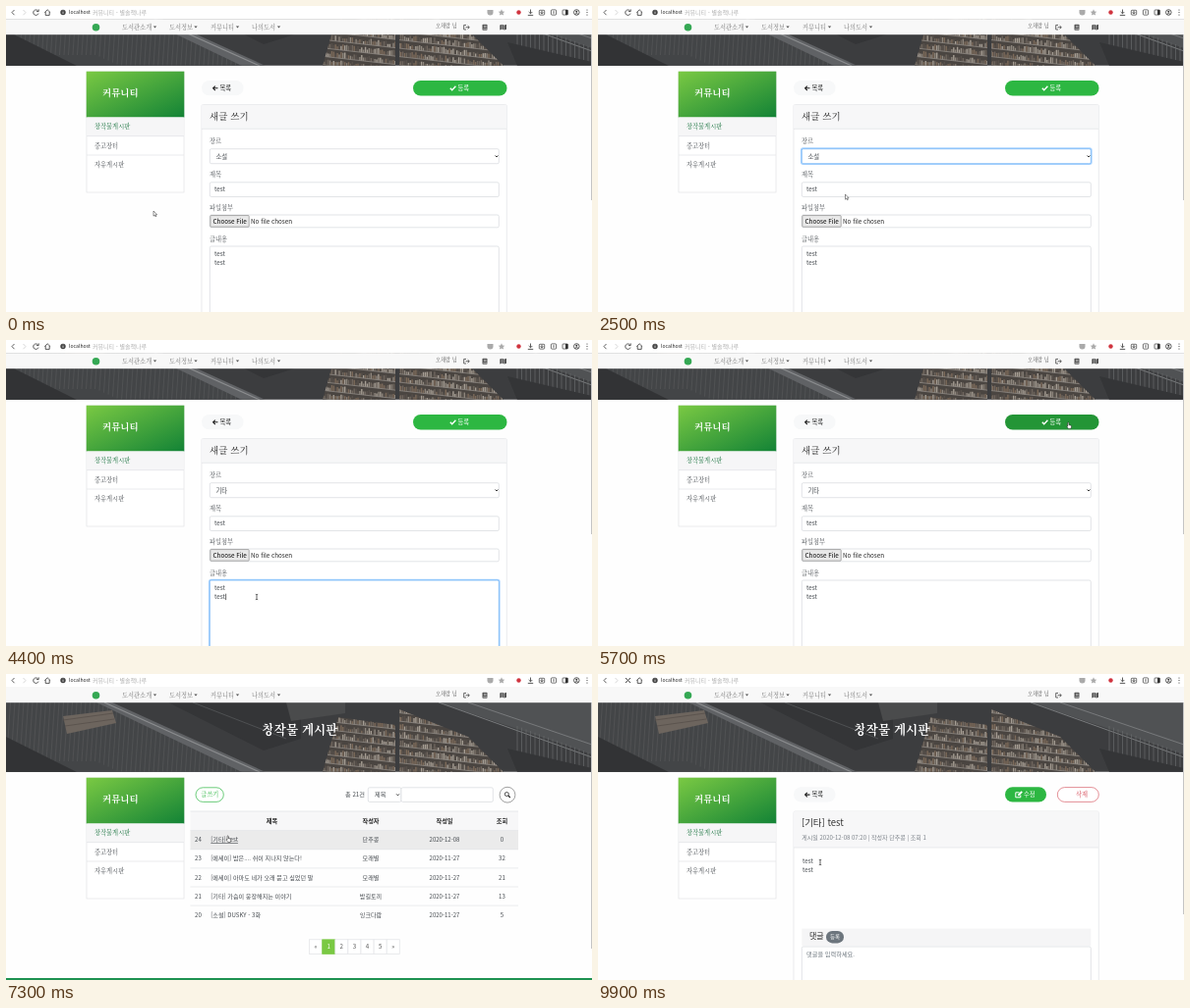
Write an HTML page that moves like this. It is 596 by 312 pixels and loops after 10000 ms.

```html
<!DOCTYPE html>
<html lang="ko">
<head>
<meta charset="utf-8">
<style>
html, body { margin: 0; width: 100%; height: 100%; overflow: hidden; background: #fff; }
svg { display: block; width: 596px; height: 312px; }
text { font-family: "Noto Sans CJK KR", "Noto Sans KR", "Noto Sans CJK", sans-serif; white-space: pre; }
.serif { font-family: "Noto Serif CJK KR", "Noto Serif KR", "Noto Sans CJK KR", serif; font-weight: 500; }
.strong { font-weight: 600; }
</style>
</head>
<body>
<svg id="stage" viewBox="0 0 596 312"></svg>
<script>
const LOOP = 10000, STEP = 100;
const GREEN = '#2db742', DARK = '#44494e', LINE = '#e1e3e6', PALE = '#f7f7f8';
const AUTHOR = '단추콩';

// y is the vertical middle of the text
const text = (x, y, s, size = 6.3, fill = DARK, more = '') =>
  `<text x="${x}" y="${y + size * .36}" font-size="${size}" fill="${fill}" ${more}>${s}</text>`;
const serif = (x, y, s, size = 6.25, fill = DARK, more = '', cls = '') =>
  text(x, y, s, size, fill, `class="serif ${cls}" ${more}`);
const MID = 'text-anchor="middle"';
const rect = (x, y, w, h, fill, stroke = 'none', r = 0) =>
  `<rect x="${x}" y="${y}" width="${w}" height="${h}" rx="${r}" fill="${fill}" stroke="${stroke}" stroke-width=".7"/>`;
const path = (d, stroke = DARK, w = .8, fill = 'none') =>
  `<path d="${d}" stroke="${stroke}" stroke-width="${w}" fill="${fill}"/>`;
const shape = (d, fill) => path(d, 'none', 0, fill);
const circle = (x, y, r, fill, stroke = 'none') =>
  `<circle cx="${x}" cy="${y}" r="${r}" fill="${fill}" stroke="${stroke}" stroke-width=".8"/>`;
const at = (x, y, s) => `<g transform="translate(${x} ${y})">${s}</g>`;
const clip = (id, s) => `<g clip-path="url(#${id})">${s}</g>`;
const field = (x, y, w, h, focus) =>
  (focus ? `<rect x="${x - .6}" y="${y - .6}" width="${w + 1.2}" height="${h + 1.2}" rx="2" fill="none" stroke="#a9d3ff" stroke-width="1.5"/>` : '') +
  rect(x, y, w, h, '#fff', focus ? '#64adf5' : '#d6d9dd', 1.5);
const chevron = (x, y) => path(`M${x - 1.4} ${y - .8}l1.4 1.5 1.4-1.5`, '#222', .9);

const BOOKCASES = 'M338 44L396 52V100H322zM400 36L470 64 506 100H400z';
const DEFS = `<defs>
  <linearGradient id="leaf" x1="0" y1="0" x2="1" y2="1">
    <stop offset="0" stop-color="#7ac943"/><stop offset="1" stop-color="#138336"/></linearGradient>
  <clipPath id="hall"><path d="M0 29H596V99.8H0z"/></clipPath>
  <clipPath id="cases"><path d="${BOOKCASES}"/></clipPath></defs>`;

function browserBar(loading) {
  const grey = '#aaa', ink = '#333';
  return rect(0, 0, 596, 13.5, '#fff') +
    path('M8.5 4L6 6.6l2.5 2.6', ink) + path('M17.5 4L20 6.6l-2.5 2.6', '#ccc') +
    (loading ? path('M28 4l5 5M33 4l-5 5', ink, .9)
      : path('M32.6 5A2.7 2.7 0 1 0 33 7.6M33.2 3.4v2.2H31', ink)) +
    path('M39.3 6.6L42.2 3.8l2.9 2.8M40.2 6v3.4h4V6', ink) +
    circle(58, 6.5, 2.7, '#444') + path('M58 6v2M58 4.6v.8', '#fff', .7) +
    text(64, 6.4, 'localhost', 5.1, '#222') +
    text(88, 6.4, '커뮤니티 - 별솔책나루', 6, '#b0b0b0') +
    shape('M489.5 4h6v2.4a3 3 0 0 1-6 0z', grey) +
    shape('M504 3.2l1 2.2 2.3.3-1.7 1.6.5 2.3-2.1-1.1-2.1 1.1.5-2.3-1.7-1.6 2.3-.3z', grey) +
    circle(521.5, 6.5, 2.2, '#d0343f') +
    path('M533.5 3.5v4M531.7 6l1.8 1.8L535.3 6M530.8 9.4h5.4', ink) +
    rect(542.3, 4.3, 5.4, 4.8, 'none', ink, .8) + circle(545, 6.7, 1, 'none', ink) +
    rect(554.4, 3.9, 5.2, 5.2, 'none', ink, .8) + path('M557 5.2v2.6', ink) +
    rect(566, 4, 5.4, 5, 'none', ink, .8) + rect(569, 4, 2.4, 5, ink) +
    circle(580.3, 6.5, 2.8, 'none', ink) + circle(580.3, 5.8, 1, ink) + path('M578.6 8.4q1.7-1.7 3.4 0', ink) +
    [4, 6.5, 9].map(y => circle(591, y, .6, ink)).join('');
}

function siteNav() {
  const menu = [[118, '도서관소개', 151.5], [166, '도서정보', 193], [208, '커뮤니티', 235.5], [250, '나의도서', 277.5]];
  return rect(0, 13.5, 596, 15.7, '#f8f8f8') + path('M0 13.5H596', '#e6e6e6', .5) +
    circle(91.5, 21.8, 3.8, '#35a854') +
    menu.map(([x, s, a]) => serif(x, 21.3, s, 6.25, '#777') + shape(`M${a - 1.7} 20.5h3.4l-1.7 1.9z`, '#555')).join('') +
    serif(437, 20.2, '오채람 님', 5.2, '#555') +
    path('M468 19.4h-2.3v4.6h2.3M467.5 21.7h3.6M469.6 20l1.7 1.7-1.7 1.7', '#555', .9) +
    rect(484.5, 18.7, 5, 6, '#555', 'none', .8) + path('M486 20.3h2.5M486 21.6h2.5M485.4 23.6h4', '#f8f8f8', .5) +
    shape('M502.3 19.6l2-.8v5l-2 .8zM504.7 18.8l1.9.8v5l-1.9-.8zM507 19.6l2-.8v5l-2 .8z', '#555');
}

// Library hall behind the page title: railing and stairs on the left, bookcases on the right
function photo() {
  let seed = 7;
  const rnd = () => (seed = seed * 16807 % 2147483647) / 2147483647;
  let rails = '', balusters = '', shelves = '', books = '';
  for (let x = 0; x < 250; x += 4.5) rails += `M${x} ${Math.max(29, x * .45 - 14)}l-4 60`;
  for (let x = 520; x < 600; x += 4.5) balusters += `M${x} ${29 + (x - 455) * .37}v26`;
  for (let y = 34; y < 104; y += 8.5) {
    shelves += `M315 ${y - 4}L510 ${y + 18}`;
    for (let x = 320; x < 505; x += 1.9) {
      books += path(`M${x} ${y - 4 + (x - 315) * .113}v${-3 - rnd() * 3.5}`,
        ['#8d857c', '#6f665e', '#a59d93', '#57504b', '#7c6a5a'][rnd() * 5 | 0], 1.4);
    }
  }
  return clip('hall', rect(0, 29, 596, 71, '#3c3d3f') +
    shape('M0 29H95L250 100H0z', '#434547') + path(rails, '#56585a', .7) +
    shape('M58 43L108 37 112 50 62 61z', '#6d655e') + path('M58 47L109 40M60 53L110 46', '#57504b', .8) +
    shape('M0 64L72 100H0z', '#323335') +
    shape('M92 29H108L264 100H240z', '#606265') + path('M100 29L258 100', '#8b8d8f', 1.1) +
    shape('M165 29H300V66L262 78z', '#343537') + path('M190 29L285 66', '#4e5052', 1) +
    shape('M285 29H345V40L290 48z', '#4a4b4c') +
    shape(BOOKCASES, '#4a4541') + clip('cases', books + path(shelves, '#8f8a84', .8)) +
    shape('M440 29H596V82z', '#505254') + path('M440 29L596 85M470 29L596 72', '#77797b', 1) +
    path(balusters, '#686a6c', .7) + shape('M510 76L596 96V100H520z', '#343537'));
}
const PHOTO = photo();

function sidebar(active) {
  const row = (y, s, c) => serif(90, y, s, 6.25, c);
  return rect(82, 106, 99, 123, '#fff', LINE) + rect(81.7, 105.7, 99.6, 46.8, 'url(#leaf)') +
    serif(98, 128, '커뮤니티', 9.5, '#fff', '', 'strong') +
    rect(82.3, 152.5, 98.4, 19.1, active ? '#f6f6f7' : '#fff') +
    path('M82 171.6h99M82 191h99', LINE, .7) +
    row(162, '창작물게시판', active ? '#14703a' : DARK) + row(181.3, '중고장터') + row(200.5, '자유게시판');
}

const backButton = y => rect(199, y, 42.5, 15.3, '#f7f8f9', 'none', 7.6) +
  path(`M215.5 ${y + 7.8}h-4.8M212.8 ${y + 5.6}l-2.2 2.2 2.2 2.2`, '#222', 1.1) + text(217.5, y + 7.6, '목록', 6.3, '#222');

function formPage(t) {
  const selectFocus = t >= 1500 && t < 4200, areaFocus = t >= 4200 && t < 5600;
  const hover = t >= 5400;
  const caret = areaFocus && (t - 4200) % 1000 < 500;
  return at(0, -39, PHOTO + sidebar(true)) + backButton(76) +
    rect(414, 76, 95.5, 15.4, hover ? '#239536' : GREEN, 'none', 7.7) +
    path('M451.8 83.8l1.9 2 3.7-4', '#fff', 1.4) + text(459.5, 83.6, '등록', 6.3, '#fff') +
    rect(199, 100.5, 310.3, 230, '#fff', LINE, 1.5) + rect(199.4, 100.9, 309.5, 24.3, PALE) + path('M199 125.3h310', LINE, .7) +
    serif(207, 112.2, '새글 쓰기', 9.5, '#222') +
    serif(207, 138, '장르') + serif(207, 172, '제목') + serif(207, 205.5, '파일첨부') + serif(207, 237.3, '글내용') +
    field(207.3, 145.7, 294, 15, selectFocus) + text(213.5, 153.3, t >= 3000 ? '기타' : '소설') + chevron(499, 153.3) +
    field(207.3, 179.8, 294, 14.7) + text(212, 187, 'test') +
    field(207.3, 213, 294, 12.8) + rect(207.8, 213.6, 39.4, 11.6, '#e9e9e9', '#888', .8) +
    text(210.6, 219.4, 'Choose File', 6.3, '#000') + text(249, 219.4, 'No file chosen', 6.3, '#222') +
    field(207.3, 245, 294, 90, areaFocus) + text(212, 252.6, 'test') + text(212, 262, 'test') +
    (caret ? path('M223.6 258.7v6.4', '#000', .6) : '');
}

function banner(loaded) {
  return (loaded ? PHOTO : rect(0, 29, 596, 70.8, '#4a4a4a')) +
    serif(299, 56.3, '창작물 게시판', 12.6, '#fff', MID, 'strong');
}

const POSTS = [
  [24, '[기타] test', AUTHOR, '2020-12-08', 0],
  [23, '[에세이] 밤은.... 쉬이 지나지 않는다!', '모래별', '2020-11-27', 32],
  [22, '[에세이] 아마도 네가 오래 묻고 싶었던 말', '모래별', '2020-11-27', 21],
  [21, '[기타] 가슴이 웅장해지는 이야기', '밤길토끼', '2020-11-27', 13],
  [20, '[소설] DUSKY - 3화', '잉크다람', '2020-11-27', 5]
];

function listPage(t) {
  const loaded = t >= 7000, hover = t >= 7200;
  const head = [[270.5, '제목'], [371, '작성자'], [446, '작성일'], [504.5, '조회']];
  const rows = POSTS.map(([no, title, who, day, views], i) => {
    const y = 169.2 + i * 19.1, on = hover && !i;
    return (on ? rect(187.5, 159.7, 333.5, 19.2, '#ebebeb') : '') +
      text(192, y, no, 6.1) + text(208.3, y, title, 6.1, DARK, on ? 'text-decoration="underline"' : '') +
      text(371, y, who, 6.1, DARK, MID) + text(446, y, day, 6, DARK, MID) + text(504.5, y, views, 6.1, DARK, MID) +
      (i < 4 ? path(`M187.5 ${y + 9.6}H521`, LINE, .7) : '');
  }).join('');
  const pages = ['«', 1, 2, 3, 4, 5, '»'].map((s, i) => {
    const x = 308.6 + i * 13.1, on = loaded && i === 1;
    return rect(x, 270.8, 13.1, 14.7, on ? '#7ac943' : '#fff', on ? '#7ac943' : LINE) +
      text(x + 6.5, 278.2, s, 6.2, on ? '#fff' : '#555', MID);
  }).join('');
  return banner(loaded) + sidebar(loaded) +
    rect(193, 115.8, 28.3, 14.6, '#fff', GREEN, 7.3) + serif(207.2, 123, '글쓰기', 6.25, GREEN, MID) +
    text(345, 123.2, '총 21건', 6.2) +
    field(368.3, 115.8, 33.7, 14.6) + text(375, 123, '제목', 6.2) + chevron(398.5, 123.2) + field(402, 115.8, 93.3, 14.6) +
    circle(510, 123.2, 7.9, '#fff', '#888') + circle(509.3, 122.5, 2, 'none', '#222') + path('M510.8 124l2 2', '#222', 1.1) +
    rect(187.5, 140, 333.5, 19.5, PALE) + path('M187.5 140H521M187.5 159.5H521', LINE, .8) +
    head.map(([x, s]) => text(x, 149.7, s, 6.2, '#222', MID + ' font-weight="700"')).join('') +
    rows + pages + rect(0, 310, 596, 2, '#1d9150');
}

function postPage(t) {
  return banner(t >= 9300) + sidebar(true) + backButton(115.3) +
    rect(414, 115.3, 42, 15.3, GREEN, 'none', 7.6) +
    path('M428.5 120.8h-3.7v5h5v-2.3', '#fff', 1) + shape('M427 124.2l.3-1.6 3.3-3.3 1.3 1.3-3.3 3.3z', '#fff') +
    text(433, 123, '수정', 6.3, '#fff') +
    rect(467.3, 115.6, 42, 14.8, '#fff', '#d9606a', 7.4) + serif(492, 123, '삭제', 6.25, '#d23c4a', MID) +
    rect(199, 140, 310.3, 200, '#fff', LINE, 1.5) + rect(199.4, 140.4, 309.5, 36.5, PALE) + path('M199 177h310', LINE, .7) +
    text(207, 151.3, '[기타] test', 9.45, '#333') +
    text(207.3, 167.3, `게시일 2020-12-08 07:20 | 작성자 ${AUTHOR} | 조회 1`, 6, '#7b8188') +
    text(208, 190.6, 'test', 6.2) + text(208, 200, 'test', 6.2) +
    rect(207.3, 259.6, 294, 17.6, '#f5f5f6') + text(215, 267.6, '댓글', 8, '#222') +
    rect(232, 262, 18, 12.4, '#6c757d', 'none', 6.2) + text(241, 268.2, '등록', 5.5, '#fff', MID) +
    field(207.3, 278, 294, 60) + text(212, 285.6, '댓글을 입력하세요.', 6.2, '#6c757d');
}

// Pointer stops: time, x, y
const TRACK = [
  [100, 150, 209], [300, 154, 205], [400, 154, 205], [1300, 250, 153], [1700, 250, 153], [2500, 251.5, 192],
  [2900, 252, 213], [3600, 252, 214], [4200, 255, 262], [4700, 255, 262], [5600, 478, 84], [5900, 478, 84],
  [6800, 282.5, 144], [6900, 282.5, 144], [7300, 225.3, 165], [9100, 225.3, 165], [9700, 226, 192], [10000, 226, 192]
];

function pointer(t) {
  const i = Math.max(1, TRACK.findIndex(p => p[0] > t));
  const [a, x0, y0] = TRACK[i - 1], [b, x1, y1] = TRACK[i];
  const u = Math.max(0, (t - a) / (b - a)), k = u * u * (3 - 2 * u);
  const x = x0 + (x1 - x0) * k, y = y0 + (y1 - y0) * k;
  const hand = (t >= 5400 && t < 6000) || (t >= 7200 && t < 9100);
  const beam = (t >= 4000 && t < 4900) || t >= 9500;
  return at(x, y,
    hand ? path('M-.3 .3q.7-.7 1.2 0V2.5l2.2.7q.6.3.5 1L3 6.4H.4L-1.3 4q0-.9 1 0z', '#111', .5, '#fff')
    : beam ? path('M-1.2-2.7Q0-2.7 0-2 0-2.7 1.2-2.7M0-2V2M-1.2 2.7Q0 2.7 0 2 0 2.7 1.2 2.7', '#222', .7)
    : path('M0 0V5.2L1.2 4.1 2 5.8 2.8 5.4 2 3.8H3.6z', '#222', .5, '#fff'));
}

function scene(t) {
  const loading = (t >= 5900 && t < 7000) || t >= 8100;
  const [page, thumb] = t < 6600 ? [formPage, 198] : t < 9100 ? [listPage, 280] : [postPage, 245];
  return DEFS + rect(0, 0, 596, 312, '#fefefe') + page(t) + siteNav() + browserBar(loading) +
    rect(595, 29, 1, thumb - 29, '#c4c4c4') + pointer(t);
}

const stage = document.getElementById('stage');
const start = performance.now();
let shown = -1;
function draw() {
  const t = Math.floor((performance.now() - start) % LOOP / STEP) * STEP;
  if (t !== shown) stage.innerHTML = scene(shown = t);
  requestAnimationFrame(draw);
}
draw();
</script>
</body>
</html>
```
